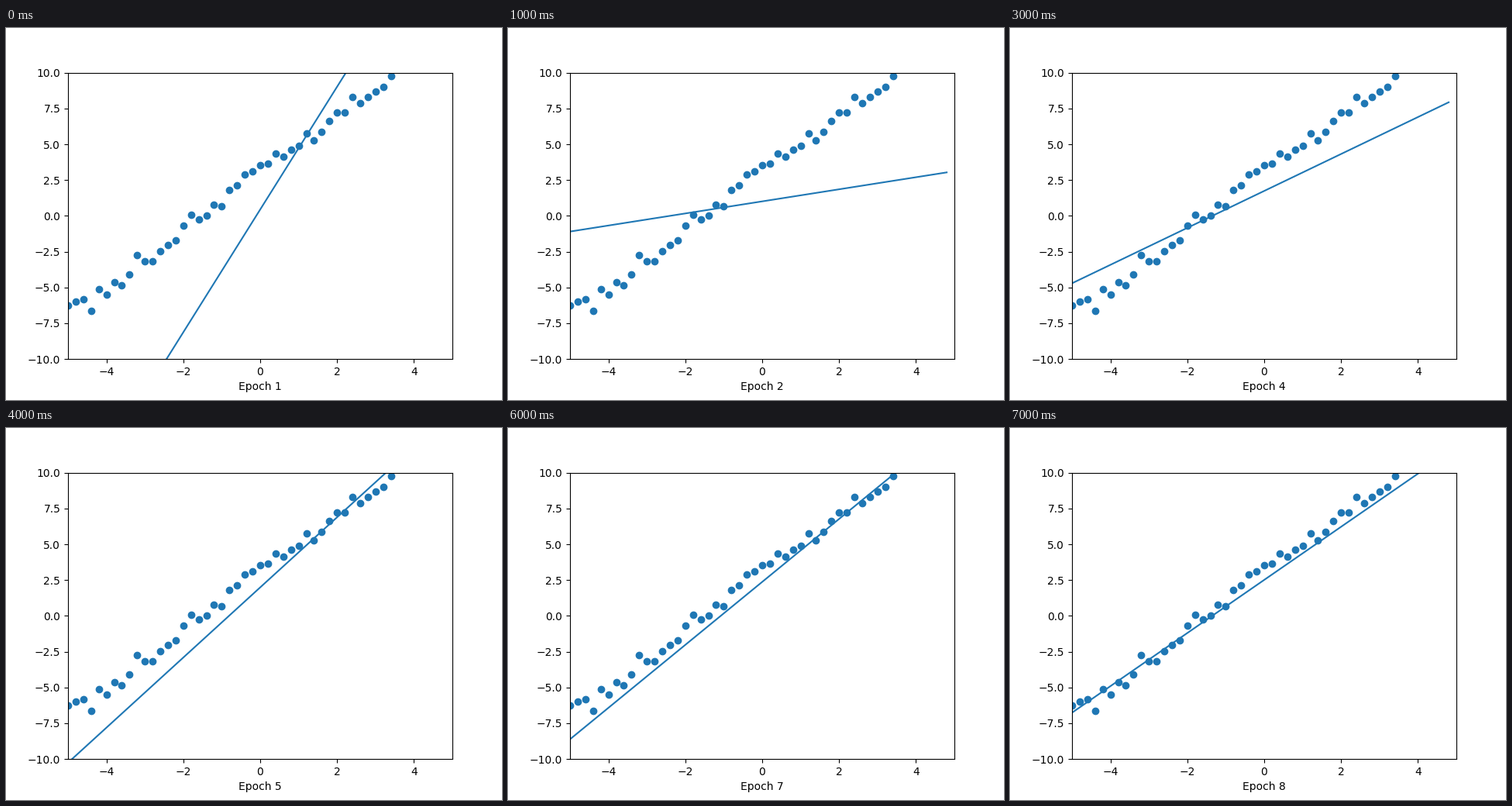
These frames come from a looping animation (640x480 px, 8000 ms). A matplotlib script:

```python
import numpy as np
import matplotlib.pyplot as plt
from matplotlib.animation import FuncAnimation

EPOCHS = 8
RATE = 0.1

x = np.arange(50) * 0.2 - 5
samples = [
    -6.26, -5.98, -5.82, -6.63, -5.12, -5.50, -4.63, -4.85, -4.09, -2.74,
    -3.17, -3.17, -2.47, -2.03, -1.71, -0.68, 0.08, -0.25, 0.02, 0.78,
    0.67, 1.81, 2.13, 2.89, 3.11, 3.54, 3.65, 4.35, 4.13, 4.62,
    4.89, 5.76, 5.27, 5.87, 6.62, 7.22, 7.22, 8.30, 7.87, 8.30,
    8.68, 9.00, 9.76,
]

# Least-squares optimum and the offset from it after the first epoch
best = np.array([2.0, 3.05])
start = np.array([2.285, -2.605])

# One gradient step on the mean squared error, as a linear map of the offset
hessian = 2 * np.array([[np.mean(x * x), np.mean(x)], [np.mean(x), 1]])
step = np.eye(2) - RATE * hessian


def fit(epoch):
    """Slope and intercept after the given epoch."""
    return best + np.linalg.matrix_power(step, epoch - 1) @ start


fig, ax = plt.subplots(figsize=(6.4, 4.8), dpi=100)
ax.set_xlim(-5, 5)
ax.set_ylim(-10, 10)
ax.scatter(x[:len(samples)], samples)
line, = ax.plot(x, x, color="C0")


def draw(i):
    slope, intercept = fit(i + 1)
    line.set_ydata(slope * x + intercept)
    ax.set_xlabel(f"Epoch {i + 1}")
    return line, ax.xaxis.label


anim = FuncAnimation(fig, draw, frames=EPOCHS, interval=1000, repeat=True)
plt.show()
```
